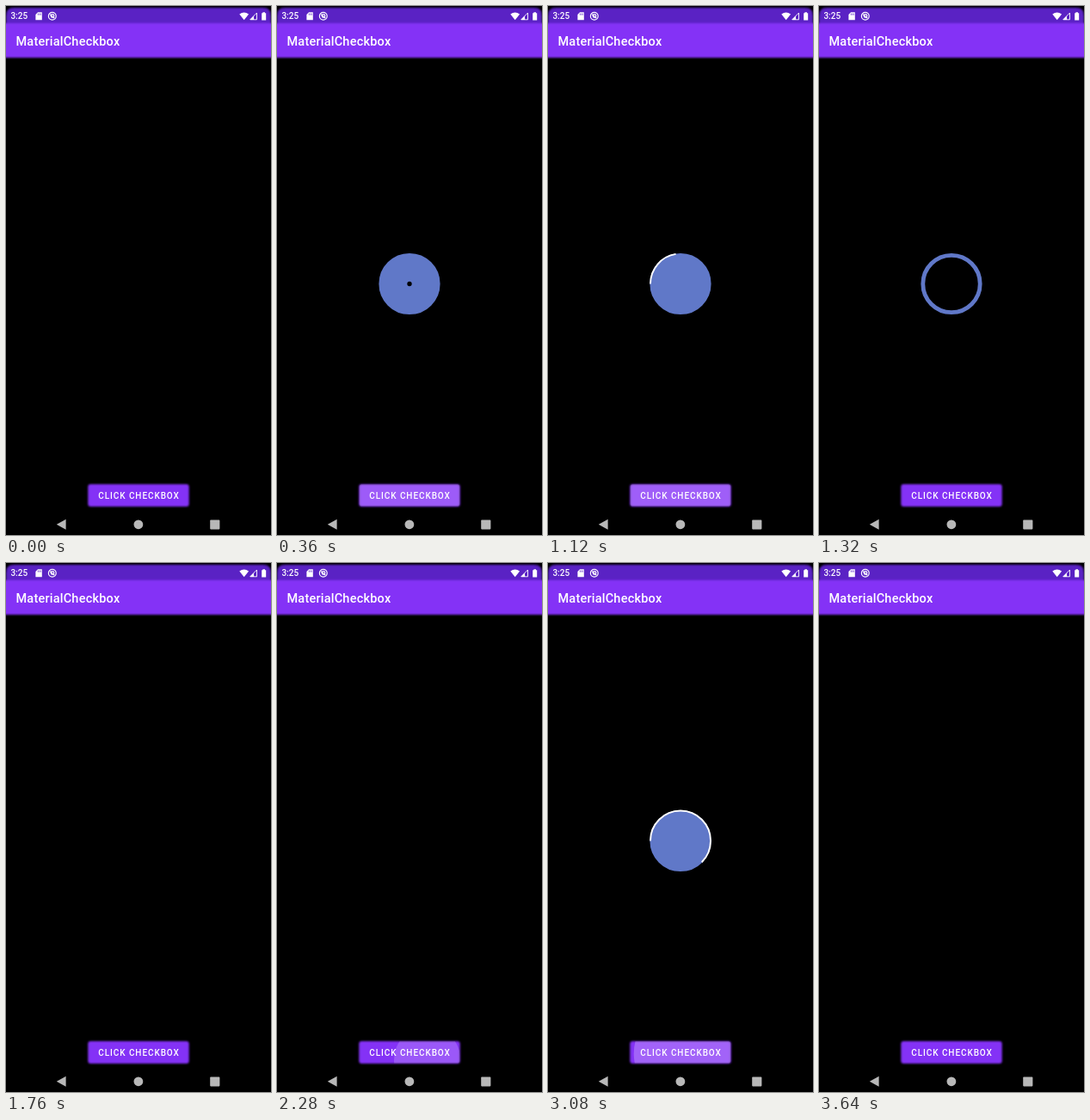
An HTML page for the animation above (3720 ms loop, 308 by 614 pixels).

```html
<!DOCTYPE html>
<html lang="en">
<head>
<meta charset="utf-8">
<title>Checkbox</title>
<style>
  html, body { margin: 0; width: 100%; height: 100%; overflow: hidden; background: #000; }
  svg { display: block; width: 308px; height: 614px; }
  text { font-family: Roboto, "Open Sans", sans-serif; fill: #fff; font-weight: 500; }
  .title { font-size: 14.5px; letter-spacing: .22px; }
  .clock { font-size: 10px; }
  .label { font-size: 10px; letter-spacing: .92px; }
</style>
</head>
<body>
<svg viewBox="0 0 308 614">
  <defs>
    <clipPath id="button"><rect x="95.7" y="555.2" width="116.6" height="25.4" rx="2.8"/></clipPath>
    <filter id="soft" x="-10%" y="-20%" width="120%" height="140%"><feGaussianBlur stdDeviation=".8"/></filter>
  </defs>
  <rect width="308" height="614"/>

  <!-- status and app bars -->
  <g filter="url(#soft)">
    <path d="M0 21V11Q0 2 9 2H299Q308 2 308 11V21Z" fill="#5a20c4"/>
    <rect x="-4" y="20" width="316" height="40" fill="#8432f6"/>
  </g>
  <text class="clock" x="5.4" y="15.4">3:25</text>
  <text class="title" x="11.4" y="45.6">MaterialCheckbox</text>
  <g fill="#fff">
    <path d="M37 7.3H41.8V16.3H34.4V10Z"/>
    <path d="M37.2 8.6V10.6M38.8 8.6V10.6M40.3 8.6V10.6" stroke="#5a20c4" stroke-width=".7"/>
    <path d="M271.3 9.6Q276.7 5.6 282.1 9.6L276.7 16.2Z"/>
    <path d="M288 11.5V16H283.5Z"/>
    <path d="M291.5 8V15.8H283.8Z" fill="none" stroke="#fff" stroke-width=".9"/>
    <path d="M298.4 7.2H301V8.2H302.2V16.4H297.2V8.2H298.4Z"/>
  </g>
  <g fill="none" stroke="#fff" stroke-width="1.2">
    <circle cx="53.8" cy="11.8" r="4.4"/>
    <path d="M51.2 9.8L56.4 14.2"/>
    <circle cx="54" cy="11.5" r="1.8"/>
  </g>

  <!-- checkbox -->
  <g fill="none">
    <circle id="fill" cx="154" cy="322.5" stroke="#6078c8"/>
    <path id="outline" d="M119 322.5A35 35 0 0 1 189 322.5A35 35 0 0 1 119 322.5" pathLength="100" stroke="#fff" stroke-width="1.9"/>
    <path id="tick" d="M136 322L148.6 333.6L172 308.4" pathLength="100" stroke="#fff" stroke-width="5.8" stroke-linecap="round" stroke-linejoin="round"/>
  </g>

  <!-- button -->
  <rect x="95.3" y="554.9" width="117.4" height="26" rx="3" fill="#8432f6" filter="url(#soft)"/>
  <circle id="ripple" fill="#fff" clip-path="url(#button)"/>
  <text class="label" x="107.3" y="571.5">CLICK CHECKBOX</text>

  <!-- navigation -->
  <g fill="#b8b8b8">
    <path d="M58.8 601.8L69.6 595.8V607.8Z"/>
    <circle cx="153.9" cy="601.8" r="5.4"/>
    <rect x="237.2" y="596.6" width="11.2" height="10.8" rx=".8"/>
  </g>
</svg>
<script>
  const LOOP = 3720, TAP = 66, MORPH = 400, RADIUS = 35.6;
  const presses = [110, 882, 2250, 2890]; // alternately check and uncheck
  const el = id => document.getElementById(id);
  const fill = el('fill'), outline = el('outline'), tick = el('tick'), ripple = el('ripple');

  const clamp = v => Math.min(1, Math.max(0, v));
  const part = (v, from, to) => clamp((v - from) / (to - from));
  const mix = (a, b, p) => a + (b - a) * p;
  const set = (node, attrs) => {
    for (const key in attrs) node.setAttribute(key, attrs[key]);
  };

  function trim(node, p) {
    set(node, { 'stroke-dasharray': `${p * 100} 200`, visibility: p > 0 ? 'visible' : 'hidden' });
  }

  function drawBox(p) {
    const width = RADIUS * part(p, 0, .5);
    set(fill, { r: RADIUS - width / 2, 'stroke-width': width });
    trim(outline, part(p, .5, .8));
    trim(tick, part(p, .8, 1));
  }

  // Grows from the touch point towards the button's centre, then fades.
  function drawRipple(age) {
    const grow = part(age, 0, 225);
    const alpha = part(age, 0, 40) * (1 - part(age, 225, 375));
    set(ripple, {
      cx: mix(178, 154, grow),
      cy: mix(578, 568, grow),
      r: mix(35, 62, grow),
      opacity: .24 * alpha
    });
  }

  function draw(now) {
    const t = now % LOOP;
    let checked = 0, age = -1;
    presses.forEach((press, i) => {
      if (t < press) return;
      const p = clamp((t - press - TAP) / MORPH);
      checked += i % 2 ? -p : p;
      age = t - press;
    });
    drawBox(clamp(checked));
    drawRipple(age);
  }

  const start = performance.now();
  function frame() {
    draw(performance.now() - start);
    requestAnimationFrame(frame);
  }
  frame();
</script>
</body>
</html>
```
